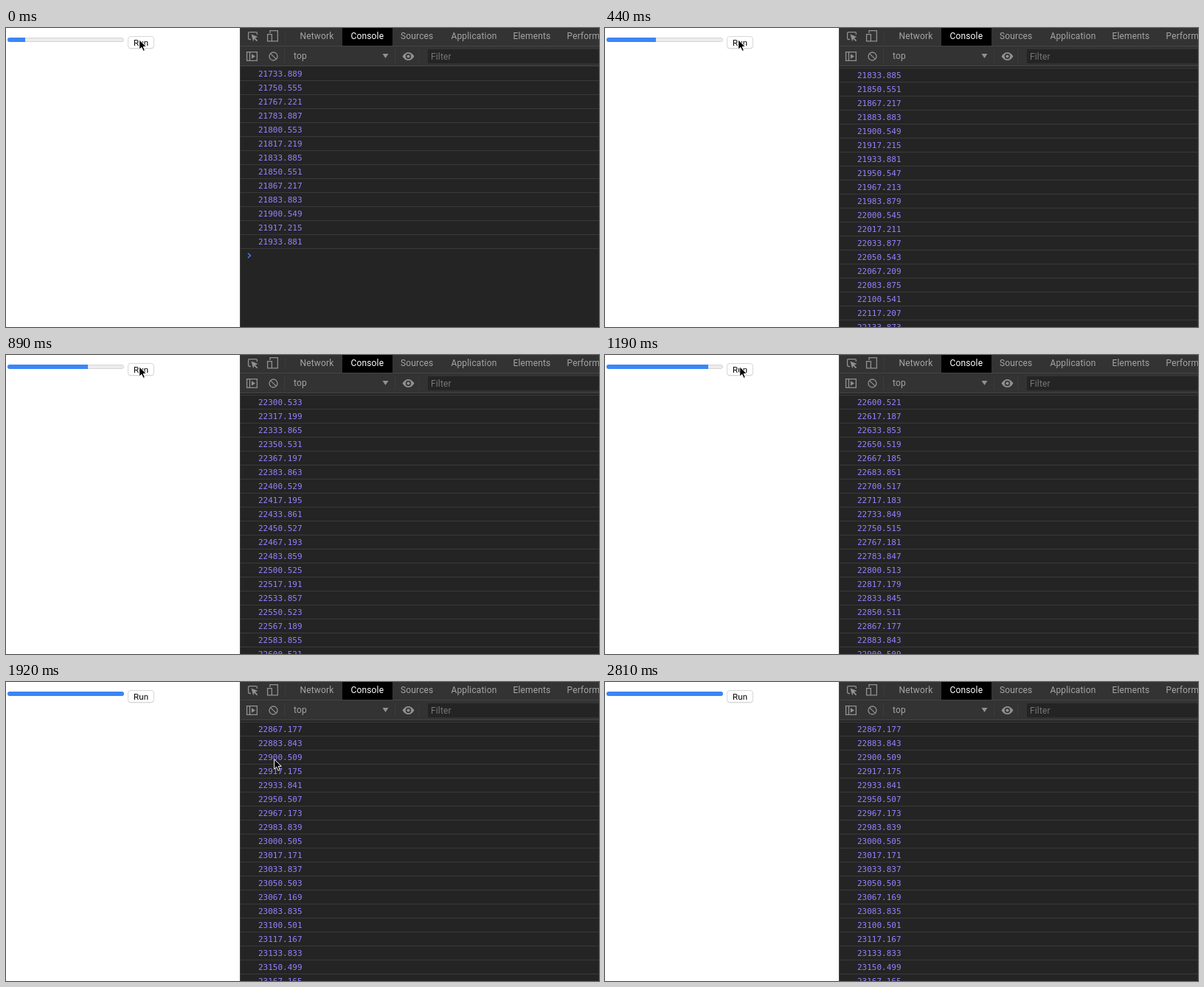
Recreate the animation shown at these times as an HTML page. Size 804 by 406 pixels, loop 3560 ms.

```html
<!DOCTYPE html>
<html lang="en">
<head>
<meta charset="utf-8">
<style>
  html, body { margin: 0; width: 100%; height: 100%; overflow: hidden; background: #fff; }
  svg { display: block; }
  text { font: 12px Roboto, sans-serif; letter-spacing: .15px; fill: #a5a5a5; white-space: pre; }
  #rows text { font: 11px "DejaVu Sans Mono", monospace; letter-spacing: 0; fill: #9980ff; }
  #rows rect { fill: #3a3a3a; }
  .icon { fill: none; stroke: #919191; stroke-width: 1.3; }
  .solid { fill: #919191; }
</style>
</head>
<body>
<svg width="804" height="406" viewBox="0 0 804 406">
  <defs>
    <clipPath id="bar"><rect x="2" y="13" width="158" height="6" rx="3"/></clipPath>
    <clipPath id="log"><rect x="318" y="52" width="486" height="354"/></clipPath>
  </defs>

  <rect x="2.5" y="13.5" width="157" height="5" rx="2.5" fill="#ececec" stroke="#d6d6d6"/>
  <rect id="fill" x="2" y="13" height="6" fill="#3b86f7" clip-path="url(#bar)"/>
  <rect x="165.5" y="12.5" width="35" height="16" rx="3.5" fill="#c8c8c8" opacity=".6"/>
  <rect x="165.5" y="11.5" width="35" height="16" rx="3.5" fill="#fff" stroke="#d8d8d8"/>
  <text x="173" y="24" style="font-size:11.5px;fill:#000">Run</text>

  <rect x="317" width="487" height="406" fill="#242424"/>
  <g id="rows" clip-path="url(#log)"></g>
  <path id="prompt" d="M328 305.8l3.5 3.2-3.5 3.2" fill="none" stroke="#367cf1" stroke-width="1.6"/>

  <rect x="317" width="487" height="51" fill="#333"/>
  <path d="M317 24.5H804M317 51.5H804" stroke="#454545"/>
  <path d="M317.5 0V406" stroke="#484848"/>
  <rect x="456" width="68" height="24"/>
  <g id="tabs"></g>
  <path d="M378.5 4v16M377.5 29v18M527.5 29v18M559.5 29v18" stroke="#3c3c3c"/>
  <rect x="572" y="29" width="232" height="19" fill="#242424"/>
  <text x="390" y="42">top</text>
  <text x="576" y="43" style="fill:#777">Filter</text>
  <path class="solid" d="M510.5 35h8l-4 6z"/>

  <path class="icon" d="M332 15.5h-2q-1.400 0-1.400-1.400V7q0-1.400 1.400-1.400h9q1.400 0 1.400 1.400v2"/>
  <path class="solid" d="M332.500 8.500l9 3.500-3.600 1.500 3.300 3.500-1.200 1.200-3.400-3.400-1.400 3.400z"/>
  <path class="icon" d="M358 7V3.600h10.400v14.300H361M354.600 8.600h5.800v9.300h-5.800z"/>
  <path class="icon" d="M326.600 32.600h13.800v11.800h-13.800zM330.500 32.600v11.800"/>
  <path class="solid" d="M333 35.300v6.400l5-3.200z"/>
  <circle class="icon" cx="362.500" cy="38.500" r="5.500" stroke-width="1.600"/>
  <path class="icon" d="M358.600 34.600l7.800 7.800"/>
  <path class="solid" d="M537.500 38.500q3.500-5.500 8-5.500t8 5.500q-3.500 5.500-8 5.500t-8-5.500z"/>
  <circle cx="545.500" cy="38.500" r="3.700" fill="#333"/>
  <circle class="solid" cx="545.500" cy="38.500" r="2.100"/>

  <path id="cursor" d="M.7 1V14.200L3.800 11.300 6.100 16.400 8.400 15.400 6.200 10.400H10.300Z" stroke="#fff"/>
</svg>
<script>
const LOOP = 3560, ROW = 19, ROWS = 19;
const times = [0, 150, 300, 440, 590, 740, 890, 1040, 1190, 1330, 1480,
               1920, 2070, 2210, 2360, 2510, 2660, 2810];
const firstRow = [0, 0, 0, 6, 16, 25, 34, 43, 52, 60, 68];
const rest = [180, 15];
const pointer = [rest, rest, rest, rest, rest, rest, rest, [181, 15], [182, 15], [236, 50], [311, 107],
                 [363, 104], [457, 180], [515, 211], [672, 324], [701, 339], [783, 386], null];
const $ = id => document.getElementById(id);

function add(parent, tag, attrs, content = '') {
  const el = document.createElementNS('http://www.w3.org/2000/svg', tag);
  for (const key in attrs) el.setAttribute(key, attrs[key]);
  el.textContent = content;
  return parent.appendChild(el);
}

const tabs = { Network: 398.5, Console: 467.5, Sources: 535, Application: 603.5,
               Elements: 687.5, Performance: 760.5 };
for (const name in tabs) {
  const tab = add($('tabs'), 'text', { x: tabs[name], y: 15 }, name);
  if (name === 'Console') tab.style.fill = '#fff';
}

const topLine = add($('rows'), 'rect', { x: 318, y: 52, width: 486, height: 1 });
const rows = Array.from({ length: ROWS }, (_, i) => {
  const g = add($('rows'), 'g', { transform: `translate(0 ${52 + i * ROW})` });
  add(g, 'rect', { x: 318, y: 19, width: 486, height: 1 });
  return { g, label: add(g, 'text', { x: 342, y: 14 }) };
});

let shown = -1;
function draw(step) {
  const first = firstRow[Math.min(step, 10)];
  const edge = step > 9 ? 160 : Math.round(26.4 + 14.15 * step);
  $('fill').setAttribute('width', edge - 2);

  $('rows').style.transform = '';
  const shift = step > 2 ? 2 : 0;
  topLine.setAttribute('y', 52 + shift);
  topLine.style.display = shift ? '' : 'none';
  rows.forEach(({ g, label }, i) => {
    g.setAttribute('transform', `translate(0 ${52 + shift + i * ROW})`);
    g.style.display = step || i < 13 ? '' : 'none';
    label.textContent = (21733.889 + 16.666 * (first + i)).toFixed(3);
  });
  $('prompt').style.display = step ? 'none' : '';

  const at = pointer[step];
  $('cursor').style.display = at ? '' : 'none';
  if (at) $('cursor').setAttribute('transform', `translate(${at})`);
}

function tick() {
  const t = performance.now() % LOOP;
  const step = times.filter(start => start <= t).length - 1;
  if (step !== shown) draw(shown = step);
  requestAnimationFrame(tick);
}
tick();
</script>
</body>
</html>
```
